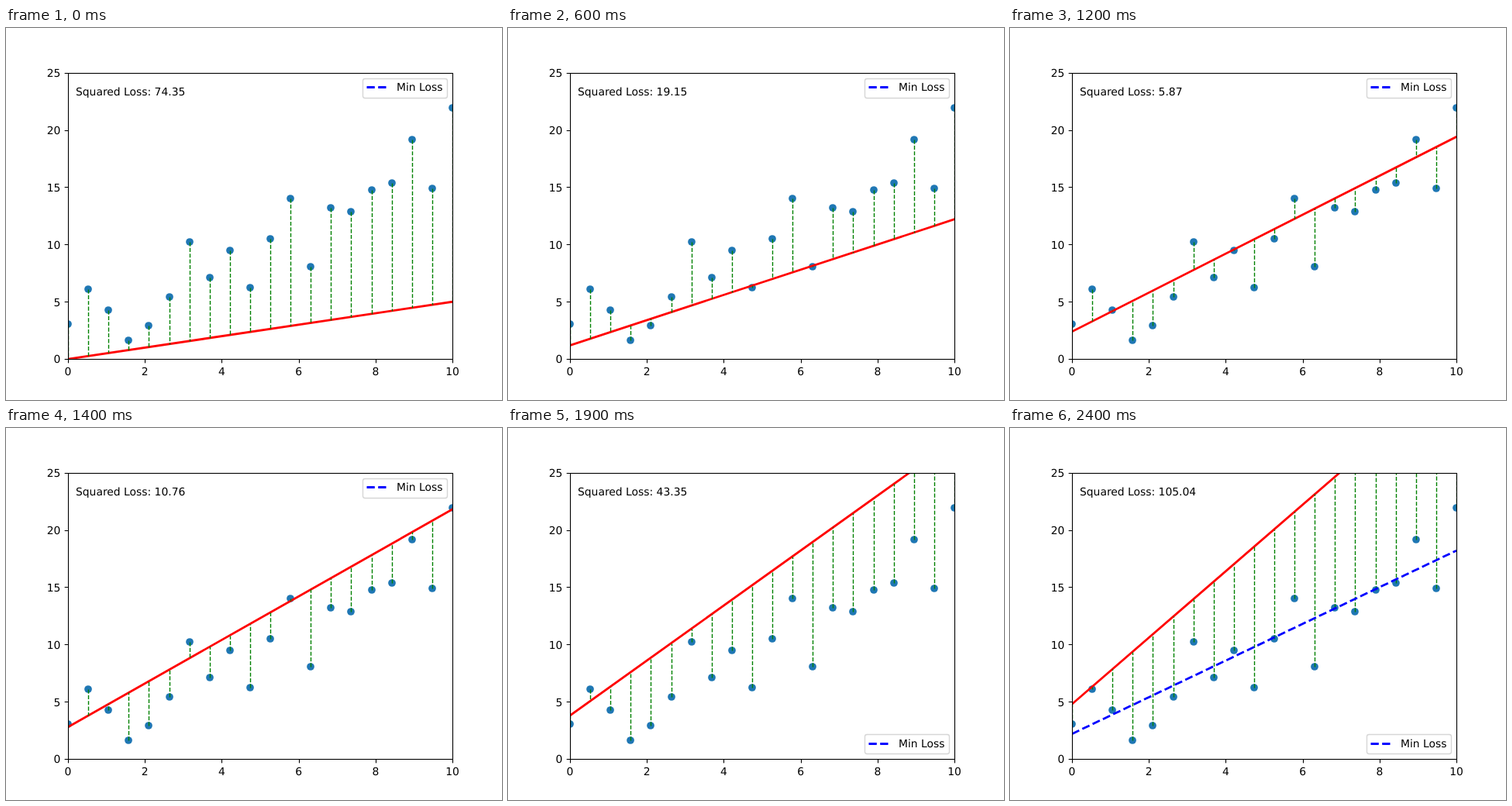
Animation, 640 px wide and 480 px high, one loop 2500 ms. Source, as an HTML page:

```html
<!DOCTYPE html>
<html lang="en">
<head>
<meta charset="utf-8">
<title>Squared loss of a moving line</title>
<style>
  html, body { margin: 0; width: 100%; height: 100%; overflow: hidden; background: #fff; }
  svg { display: block; }
  text { font: 13.89px "DejaVu Sans", sans-serif; text-rendering: geometricPrecision; }
</style>
</head>
<body>
<svg id="stage" width="640" height="480" viewBox="0 0 640 480">
  <clipPath id="plot"><rect x="80" y="58" width="496" height="369"/></clipPath>
  <g clip-path="url(#plot)">
    <g id="dots" fill="#1f77b4"/>
    <path id="fit" stroke="#f00" stroke-width="2.78" stroke-linecap="square"/>
    <g id="residuals" stroke="#008000" stroke-width="1.39" stroke-dasharray="5.14 2.22"/>
    <path id="best" stroke="#00f" stroke-width="2.78" stroke-dasharray="10.28 4.44"/>
  </g>
  <g id="axes" fill="none" stroke="#000" stroke-width="1.11">
    <rect x="80.5" y="58.5" width="496" height="369"/>
  </g>
  <g id="labels"/>
  <text id="loss" x="90" y="87"/>
  <rect id="frame" x="460.5" width="109" height="25" rx="2.78" fill="#fff" fill-opacity=".8"
        stroke="#ccc" stroke-opacity=".8" stroke-width="1.39"/>
  <path id="sample" stroke="#00f" stroke-width="2.78" stroke-dasharray="10.28 4.44"/>
  <text id="caption" x="504">Min Loss</text>
</svg>
<script>
const STEP_MS = 100, STEPS = 25, BEST_STEP = 11, LEGEND_DROP_STEP = 16;
const $ = id => document.getElementById(id);
const px = x => 80 + 49.6 * x;
const py = y => 427.2 - 14.784 * y;
const crisp = v => Math.floor(v + 0.5) + 0.5;

function add(parent, tag, attrs, text = '') {
  const el = document.createElementNS('http://www.w3.org/2000/svg', tag);
  for (const name in attrs) el.setAttribute(name, attrs[name]);
  el.textContent = text;
  return $(parent).appendChild(el);
}

// Pixel heights of the samples, evenly spaced over x = 0..10
const heights = [382, 337, 364, 403, 384, 347, 276, 322, 287, 335,
                 272, 220, 308, 232, 237, 209, 200, 144, 207, 103];
const samples = heights.map((cy, i) => {
  const x = i * 10 / (heights.length - 1);
  add('dots', 'circle', { cx: Math.round(px(x)), cy, r: 4.86 });
  return { x, cy, residual: add('residuals', 'path', {}) };
});

for (let i = 0; i <= 5; i++) {
  const x = px(2 * i), y = py(5 * i);
  add('axes', 'path', { d: `M${crisp(x)} 427.5v4.86` });
  add('axes', 'path', { d: `M80.5 ${crisp(y)}h-4.86` });
  add('labels', 'text', { x, y: 448, 'text-anchor': 'middle' }, 2 * i);
  add('labels', 'text', { x: 70.4, y: Math.round(y + 5.28), 'text-anchor': 'end' }, 5 * i);
}

const predict = (step, x) => 0.2 * step + (0.5 + 0.1 * step) * x;
const linePath = step => `M80 ${py(predict(step, 0))}L576 ${py(predict(step, 10))}`;
// Mean squared error is quadratic in the step
const lossAt = step => 74.349 - 12.69171 * step + 0.582105 * step * step;

function draw(step) {
  $('fit').setAttribute('d', linePath(step));
  for (const { x, cy, residual } of samples) {
    residual.setAttribute('d', `M${crisp(px(x))} ${cy + 0.5}V${crisp(py(predict(step, x)))}`);
  }
  $('best').setAttribute('d', step === STEPS - 1 ? linePath(BEST_STEP) : '');
  $('loss').textContent = `Squared Loss: ${lossAt(step).toFixed(2)}`;

  const low = step >= LEGEND_DROP_STEP;
  $('frame').setAttribute('y', low ? 395.5 : 65.5);
  $('sample').setAttribute('d', `M465.5 ${low ? 407.5 : 76.5}h27.8`);
  $('caption').setAttribute('y', low ? 412 : 81);
}

function tick() {
  draw(Math.floor(performance.now() / STEP_MS) % STEPS);
  requestAnimationFrame(tick);
}
tick();
</script>
</body>
</html>
```
